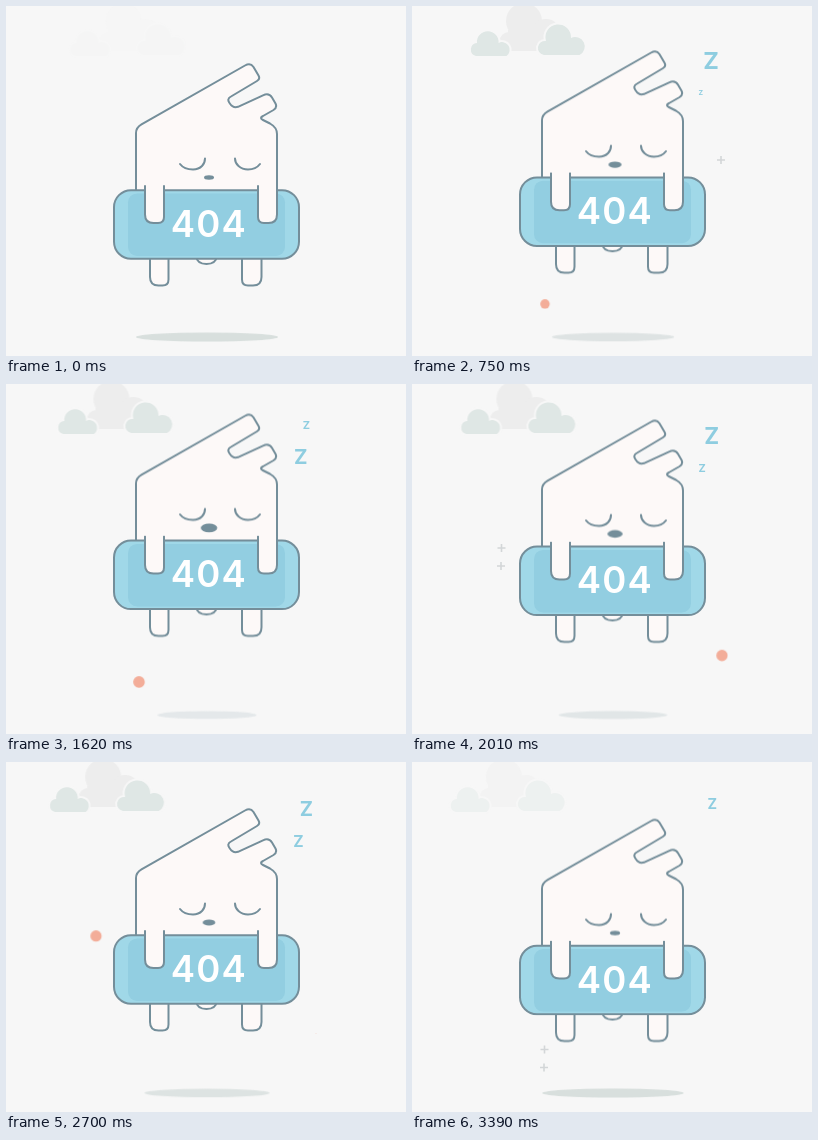
These frames come from a looping animation (400x350 px, 3420 ms). An HTML page without scripts:

```html
<!DOCTYPE html>
<html lang="en">
<head>
<meta charset="utf-8">
<title>404</title>
<style>
  html, body { margin: 0; width: 100%; height: 100%; overflow: hidden; background: #f7f7f7; }
  svg { display: block; width: 400px; height: 350px; }
  text { font-family: Inter, sans-serif; font-weight: 600; text-anchor: middle; }

  .bob, .nose, .shadow, .clouds, .extras, .dot, .plus, .z {
    animation: 3.42s linear infinite;
    animation-delay: var(--t, 0s);
  }
  .line { fill: none; stroke: #748e9a; stroke-width: 2; stroke-linecap: round; stroke-linejoin: round; }
  .skin { fill: #fdf9f8; }

  .bob { animation-name: bob; }
  @keyframes bob { 47.4% { transform: translateY(-27.6px); } }

  .nose { fill: #748e9a; transform-origin: 203px 171.5px; animation-name: nose; }
  @keyframes nose { 47.4% { transform: scale(1.65, 1.95); } }

  .shadow { fill: #d8dfdd; transform-origin: 201px 331px; animation-name: shadow; }
  @keyframes shadow { 47.4% { transform: scale(.7, .88); fill: #e4e8ea; } }

  .clouds { animation-name: drift, fade; }
  .puff { fill: #dfe7e5; stroke: #f7f7f7; stroke-width: 4; paint-order: stroke; }
  @keyframes drift { from { transform: translateX(5.7px); } to { transform: translateX(-20.3px); } }
  @keyframes fade { 0% { opacity: .08; } 7%, 94% { opacity: 1; } 100% { opacity: .3; } }

  /* Nothing carries over from one loop into the next. */
  .extras { animation-name: restart; }
  @keyframes restart { 0%, 2.6% { opacity: 0; } 2.61%, 100% { opacity: 1; } }

  /* Four bursts per loop, one every 24%. */
  .dot { fill: #f3ad99; transform: scale(0); animation-name: pulse; }
  @keyframes pulse {
    0%, 6%, 24%, 30%, 48%, 54%, 72%, 78%, 100% { transform: scale(0); }
    2.6%, 26.6%, 50.6%, 74.6% { transform: scale(.63); }
    3.8%, 27.8%, 51.8%, 75.8% { transform: scale(.95); }
    5.1%, 29.1%, 53.1%, 77.1% { transform: scale(1); }
  }
  .plus { fill: none; stroke: #d3d6d8; stroke-width: 1.6; opacity: 0; animation-name: blink; }
  @keyframes blink {
    0%, 5.6%, 24%, 29.6%, 48%, 53.6%, 72%, 77.6%, 100% { opacity: 0; }
    1%, 5.2%, 25%, 29.2%, 49%, 53.2%, 73%, 77.2% { opacity: 1; }
  }

  .z { fill: #8ecde0; font-size: 23.5px; font-weight: 700; transform: scale(0); animation-name: snore; }
  @keyframes snore {
    0% { transform: translate(288px, 90px) scale(0); }
    2.2% { transform: translate(289px, 86px) scale(.36); }
    6.1% { transform: translate(292.3px, 79px) scale(.66); }
    12% { transform: translate(296.5px, 68.3px) scale(1); }
    20% { transform: translate(299.3px, 53.7px) scale(1); }
    23.7% { transform: translate(300.3px, 47px) scale(.85); }
    26.3% { transform: translate(300.3px, 42.3px) scale(.62); }
    30%, 100% { transform: translate(301px, 35.6px) scale(0); }
  }
</style>
</head>
<body>
<svg viewBox="0 0 400 350">
  <g class="clouds">
    <g fill="#ededed">
      <circle cx="112" cy="15" r="18"/>
      <circle cx="134" cy="28" r="15"/>
      <circle cx="97" cy="35.500" r="9.500"/>
      <rect x="96" y="24" width="44" height="21"/>
    </g>
    <path class="puff" d="M64 50a6.600 6.600 0 0 1 1-13a10.800 10.800 0 1 1 21.500 0a7.650 7.650 0 0 1 8 13z"/>
    <path class="puff" d="M132 49a7 7 0 0 1 2-14a12.800 12.800 0 1 1 25-3a9.500 9.500 0 0 1 8.500 17z"/>
  </g>

  <ellipse class="shadow" cx="201" cy="331" rx="71" ry="4.500"/>

  <g class="bob">
    <g class="line">
      <path class="skin" d="M190 250Q191 258 200.500 258T211 250"/>
      <path class="skin" d="M144 245v26q0 8.500 8.500 8.500h4q6 0 6-6v-28.500"/>
      <path class="skin" d="M236 245v28.500q0 6 6 6h5q8.500 0 8.500-8.500v-26"/>
      <path class="skin" d="M130 190V127Q130 121.500 135.500 118.300L239 59.500Q244.500 56.500 247.500 61L252.500 69.500Q254.500 73 251 75
        L225 90.500Q220.500 93 223.500 97Q227 102.500 232 100.800L257 89.300Q263 86.500 266 91.500L269.500 97.500Q271.500 101.500 267.500 104
        L257 110Q253 112 257 114L264 117.500Q271 121.500 271 128V190"/>
      <path d="M174 158C177 162 182 163.500 187 163.500C195 163.500 199 158 199 152.500M229 152.500C229 158 234 163.500 242 163.500C247 163.500 251 162 254 158"/>
    </g>
    <ellipse class="nose" cx="203" cy="171.500" rx="5" ry="2.200"/>

    <rect x="108" y="184.200" width="185" height="68.500" rx="17" fill="#a0d8e8"/>
    <rect x="122" y="187.500" width="157" height="62.500" rx="9" fill="#92cee1"/>
    <rect class="line" x="108" y="184.200" width="185" height="68.500" rx="17"/>
    <g class="line">
      <path class="skin" d="M139 180v28.500q0 8.500 8.500 8.500h4.500q6 0 6-6v-31"/>
      <path class="skin" d="M252 180v31q0 6 6 6h4.500q8.500 0 8.500-8.500v-28.500"/>
    </g>
    <text x="202.800" y="231" font-size="36.500" letter-spacing="1.200" fill="#fff">404</text>
  </g>

  <g class="extras">
    <g transform="translate(90 174)"><circle class="dot" r="5.900" style="--t:.105s"/></g>
    <g transform="translate(310 271.500)"><circle class="dot" r="5.900" style="--t:.23s"/></g>
    <g transform="translate(133 298)"><circle class="dot" r="5.900" style="--t:.64s"/></g>

    <path class="plus" style="--t:.245s" d="M85.500 164h8m-4-4v8"/>
    <path class="plus" style="--t:.26s" d="M85 182h8m-4-4v8"/>
    <path class="plus" style="--t:.552s" d="M306 136h8m-4-4v8"/>
    <path class="plus" style="--t:.6s" d="M305 154h8m-4-4v8"/>
    <path class="plus" style="--t:.83s" d="M128.500 287.500h8m-4-4v8"/>
    <path class="plus" style="--t:.845s" d="M128 305.500h8m-4-4v8"/>

    <text class="z" y="8.500" style="--t:.09s">Z</text>
    <text class="z" y="8.500" style="--t:.69s">Z</text>
    <text class="z" y="8.500" style="--t:1.29s">Z</text>
    <text class="z" y="8.500" style="--t:1.89s">Z</text>
    <text class="z" y="8.500" style="--t:2.49s">Z</text>
  </g>
</svg>
</body>
</html>
```
